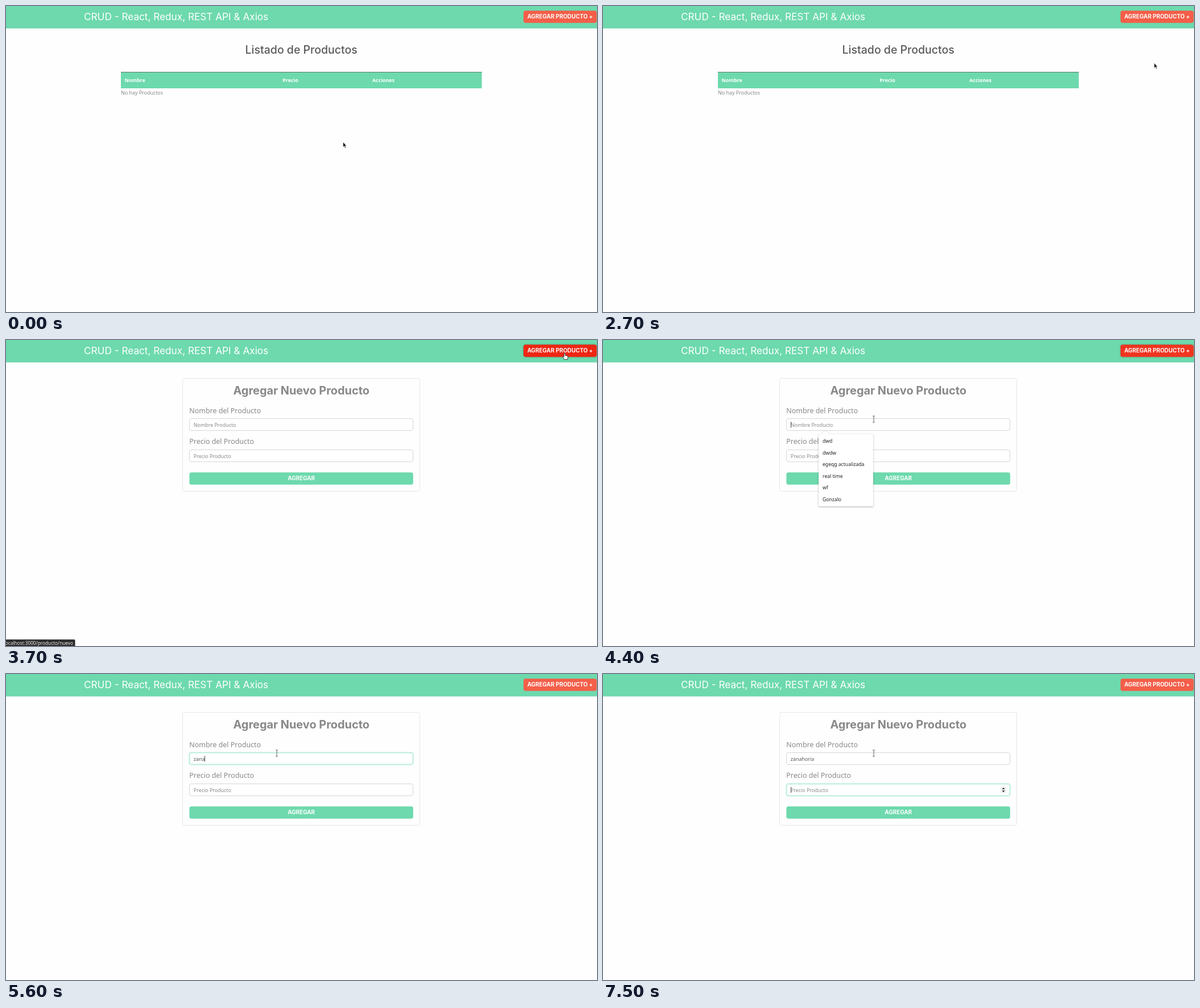
These frames come from a looping animation (1039x539 px, 8000 ms). An HTML page:

```html
<!DOCTYPE html>
<html lang="es">
<head>
<meta charset="utf-8">
<title>CRUD</title>
<style>
  html, body { margin: 0; width: 100%; height: 100%; overflow: hidden; background: #fefefe; }
  svg { display: block; }
  text { font-family: "Noto Sans", "Open Sans", sans-serif; fill: #888; white-space: pre; }
  svg { font-size: 8.9px; }
  .head { font-family: Inter, sans-serif; }
  .mid { text-anchor: middle; }
  .bold { font-weight: 700; }
  .white { fill: #fff; }
  .title { font-size: 17.2px; }
  .listing { font-size: 19.5px; font-weight: 500; fill: #5a5a5a; }
  .legend { font-size: 19.9px; }
  .button { font-size: 9.9px; font-weight: 700; fill: #fff; }
  .label { font-size: 12.45px; }
  .typed { fill: #555; }
  .address { font-size: 8.25px; fill: #eee; text-anchor: end; }
  .menu text { font-size: 8.6px; fill: #222; }
  .menu { filter: drop-shadow(0 1px 1.5px rgba(0, 0, 0, .3)); }
  .green { fill: #6dd9ad; }
  .field { fill: #fff; stroke: #d6d6d6; }
  .glow { fill: none; stroke: #d8f6ea; stroke-width: 3; }
  .edge { fill: none; stroke: #bdeedb; }
</style>
</head>
<body>
<svg width="1039" height="539" viewBox="0 0 1039 539">
  <defs>
    <rect id="box" x="322.5" width="393" height="21" rx="3.5"/>
  </defs>

  <rect class="green" width="1039" height="39.5"/>
  <text class="head white title" x="137" y="24.8">CRUD - React, Redux, REST API &amp; Axios</text>
  <rect id="add" x="909.8" y="8.2" width="128.6" height="21.5" rx="4"/>
  <text class="head mid button" x="974" y="22">AGREGAR PRODUCTO +</text>

  <g id="list">
    <text class="head mid listing" x="519.2" y="84.2">Listado de Productos</text>
    <rect class="green" x="202" y="116" width="634.5" height="29"/>
    <path d="M202 116.5H836.5" stroke="#5c7a6e"/>
    <g class="bold">
      <text class="white" x="208.5" y="133.7">Nombre</text>
      <text class="white" x="486.3" y="133.7">Precio</text>
      <text class="white" x="644" y="133.7">Acciones</text>
    </g>
    <text x="202" y="155.5">No hay Productos</text>
  </g>

  <g id="form">
    <rect x="310.5" y="67.5" width="417" height="199" rx="3.5" fill="none" stroke="#e6e6e6"/>
    <text class="head mid bold legend" x="519.2" y="96.2">Agregar Nuevo Producto</text>
    <text class="label" x="322.3" y="128.6">Nombre del Producto</text>
    <use class="field" href="#box" y="138.5"/>
    <g id="focusName">
      <use class="glow" href="#box" y="138.5"/>
      <use class="edge" href="#box" y="138.5"/>
    </g>
    <text id="name" x="329.8" y="152.7"></text>
    <text class="label" x="322.3" y="183.4">Precio del Producto</text>
    <use class="field" href="#box" y="193.5"/>
    <g id="focusPrice">
      <use class="glow" href="#box" y="193.5"/>
      <use class="edge" href="#box" y="193.5"/>
      <rect x="699" y="198" width="10" height="12" rx="1.5" fill="#f1f1f1"/>
      <path d="M701.5 203l2.5-3 2.5 3zM701.5 205.3l2.5 3 2.5-3z" fill="#333"/>
    </g>
    <text x="329.8" y="207.5">Precio Producto</text>
    <rect class="green" x="322.4" y="233.2" width="393.4" height="21.6" rx="3.5"/>
    <text class="head mid button" x="519.2" y="247.3">AGREGAR</text>
    <rect id="caret" width="1" height="10.5" fill="#555"/>
    <g id="menu" class="menu">
      <path d="M379 165.500H384L391 160L398 165.500H475V293H379Z" fill="#fff"/>
    </g>
  </g>

  <g id="status">
    <path d="M0 527.5H119.5a2 2 0 0 1 2 2V539H0Z" fill="#2b2b2b"/>
    <text class="address" x="118" y="536.6">localhost:3000/producto/nuevo</text>
  </g>

  <path id="arrow" d="M0 0V9.3L2.1 7.4L3.7 11L5.2 10.3L3.7 6.9H6.3Z" fill="#1c1c1c" stroke="#fff" stroke-width=".7"/>
  <path id="hand" d="M1 1Q1-.8 2-.8T3.2 1V3.8Q4 3.2 4.8 4Q5.7 3.6 6.3 4.4Q7.8 4 7.8 5.8V7.7L6.8 11H2L-.8 7.2Q-1.8 5.5-.6 5.2L1 6.3Z"
    fill="#fff" stroke="#222" stroke-width=".9"/>
  <path id="beam" d="M-2-5.5H2M0-5V5M-2 5.5H2" fill="none" stroke="#555" stroke-width=".9"/>
</svg>
<script>
const $ = id => document.getElementById(id);
const show = (id, on) => $(id).style.display = on ? "" : "none";
const fade = (id, amount) => $(id).style.opacity = amount;
const place = (id, x, y) => $(id).setAttribute("transform", `translate(${x} ${y})`);

["dwd", "dwdw", "egeqg actualizada", "real time", "wf", "Gonzalo"].forEach((word, i) => {
  const item = document.createElementNS("http://www.w3.org/2000/svg", "text");
  item.setAttribute("x", 386);
  item.setAttribute("y", 181.2 + i * 20.55);
  item.textContent = word;
  $("menu").append(item);
});

// All times below are in tenths of a second.
const LOOP = 80;
const PRODUCT = "zanahoria";

// Each leg of the pointer's way is a Bezier curve.
const legs = [
  { from: 8, to: 9, curve: [[592.5, 239.5], [586, 235.5]] },
  { from: 10, to: 19, curve: [[586, 235.5], [520, 25], [455.5, 82]] },
  { from: 19, to: 28, curve: [[455.5, 82], [-285, 490], [1120, 100], [972, 82]] },
  { from: 28, to: 31, curve: [[972, 82], [980, 23.5]] },
  { from: 40, to: 43, curve: [[980, 23.5], [476, 139.5]] }
];

const progress = (t, from, to) => Math.min(1, Math.max(0, (t - from) / (to - from)));
const smooth = (t, from, to) => {
  const k = progress(t, from, to);
  return k * k * (3 - 2 * k);
};
const mix = (a, b, k) => a.map((v, i) => v + (b[i] - v) * k);

function bezier(points, k) {
  if (points.length === 1) return points[0];
  return bezier(points.slice(1).map((p, i) => mix(points[i], p, k)), k);
}

// Letters typed in one burst: `lead` at the first key, then `rate` per tenth.
const burst = (t, first, lead, rate, max) =>
  t < first ? 0 : Math.min(max, Math.round(lead + (t - first) * rate));

function drawCursor(t) {
  const kind = t >= 43 ? "beam" : t >= 30 && t < 41 ? "hand" : "arrow";
  for (const id of ["hand", "beam", "arrow"]) show(id, id === kind);
  const leg = legs.filter(l => t >= l.from).pop() || legs[0];
  place(kind, ...bezier(leg.curve, progress(t, leg.from, leg.to)));
}

function drawButton(t) {
  const hover = smooth(t, 29, 32) - smooth(t, 43, 46);
  const shadow = t >= 34 ? hover * .45 : 0;
  $("add").style.fill = `rgb(${mix([244, 94, 73], [239, 38, 19], hover).map(Math.round)})`;
  $("add").style.filter = shadow ? `drop-shadow(0 .5px 1.5px rgba(90, 20, 10, ${shadow}))` : "none";
}

function drawForm(t) {
  const count = burst(t, 52, 1, .7, 4) + burst(t, 63, 1.8, .6, 5);
  const name = $("name");
  name.textContent = count ? PRODUCT.slice(0, count) : "Nombre Producto";
  name.classList.toggle("typed", count > 0);

  const onPrice = t >= 74;
  const typedWidth = count && !onPrice ? name.getComputedTextLength() : 0;
  place("caret", Math.round(329.6 + typedWidth), onPrice ? 199 : 144);
  show("caret", t >= 44 && !(t >= 50 && t < 52));

  const leave = smooth(t, 73, 75);
  fade("focusName", smooth(t, 44, 46) - leave);
  fade("focusPrice", leave);
  show("menu", t >= 44);
  fade("menu", 1 - smooth(t, 51, 53));
}

function draw() {
  const t = Math.floor(performance.now() / 100) % LOOP;
  const formOpen = t >= 35;
  show("list", !formOpen);
  show("form", formOpen);
  show("status", t >= 32 && t < 42);
  if (formOpen) drawForm(t);
  drawButton(t);
  drawCursor(t);
  requestAnimationFrame(draw);
}
draw();
</script>
</body>
</html>
```
